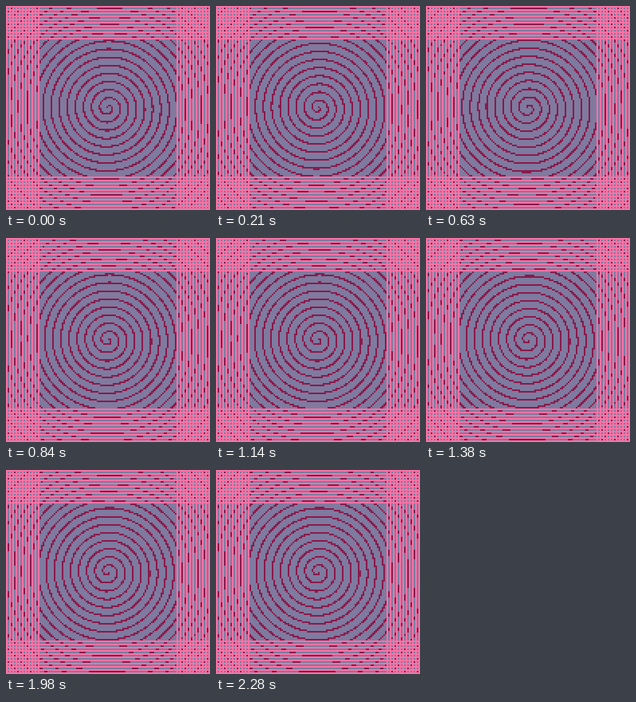
Animation, 256 px wide and 256 px high, one loop 2.31 s. Source, as an HTML page with a canvas:

```html
<!DOCTYPE html>
<html lang="en">
<head>
<meta charset="utf-8">
<title>Spiral behind stripes</title>
<style>
  html, body { margin: 0; width: 100%; height: 100%; overflow: hidden; background: #7f7a9f; }
  canvas { display: block; width: 256px; height: 256px; image-rendering: pixelated; }
</style>
</head>
<body>
<canvas id="stage" width="128" height="128"></canvas>
<script>
  const SIZE = 128, MID = 63.5, BAND = 21;
  const STEP = 30, LOOP = 2310, TURN = 300;
  const PITCH = 5.1, HALF_LINE = 0.55;
  const GROUND = '#7f7a9f', STRIPE = '#f873a5', LINE = '#8a1a4c';

  const ctx = document.getElementById('stage').getContext('2d');

  // Stripes fill every other line, mirrored about the middle.
  const edge = v => Math.min(v, SIZE - 1 - v);
  const striped = v => edge(v) < BAND && edge(v) % 2 === 0;

  function onSpiral(x, y, turn) {
    const dx = x - MID, dy = y - MID;
    const k = Math.hypot(dx, dy) / PITCH - Math.atan2(dy, dx) / (2 * Math.PI) + 0.5 - turn;
    return Math.abs(k - Math.round(k)) * PITCH < HALF_LINE;
  }

  function draw(time) {
    const turn = time / TURN;
    ctx.fillStyle = GROUND;
    ctx.fillRect(0, 0, SIZE, SIZE);
    for (let y = 0; y < SIZE; y++) {
      for (let x = 0; x < SIZE; x++) {
        if (striped(x) || striped(y)) ctx.fillStyle = STRIPE;
        else if (onSpiral(x, y, turn)) ctx.fillStyle = LINE;
        else continue;
        ctx.fillRect(x, y, 1, 1);
      }
    }
  }

  let last = -1;
  function tick() {
    const time = Math.floor(performance.now() % LOOP / STEP) * STEP;
    if (time !== last) draw(last = time);
    requestAnimationFrame(tick);
  }
  tick();
</script>
</body>
</html>
```
